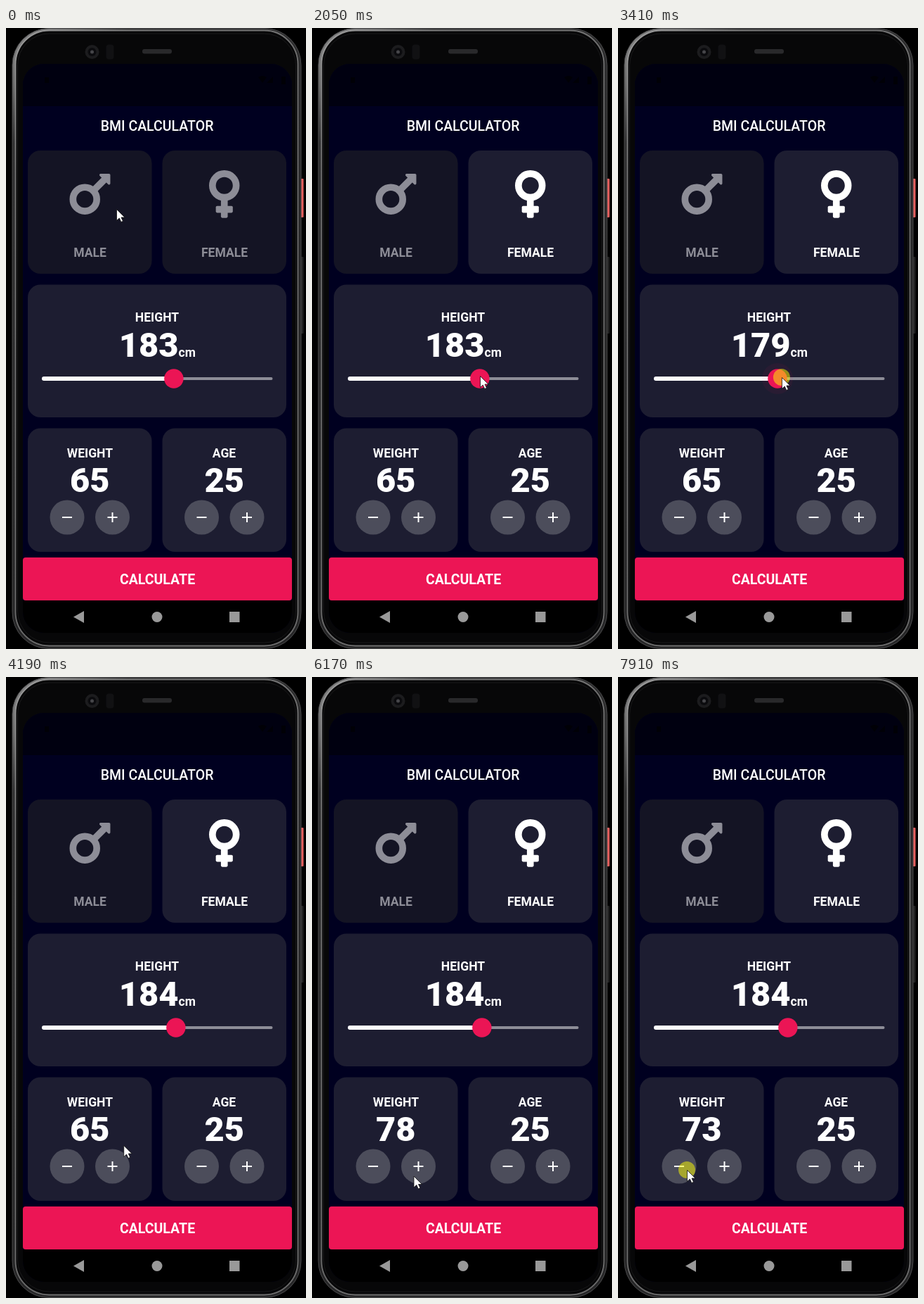
Recreate the animation shown at these times as an HTML page. Size 427 px wide and 882 px high, loop 7990 ms.

```html
<!DOCTYPE html>
<html lang="en">
<head>
<meta charset="utf-8">
<title>BMI Calculator</title>
<style>
  html, body { margin: 0; width: 100%; height: 100%; overflow: hidden; background: #000; }
  svg { display: block; width: 100vw; height: 100vh; }
  text { font-family: Roboto, sans-serif; fill: #fff; text-anchor: middle; }
  .title { font-size: 19.5px; font-weight: 500; }
  .label { font-size: 17.55px; font-weight: 700; }
  .number { font-size: 48.75px; font-weight: 900; }
  .card { fill: #1d1d31; }
  .gender { color: #8d8d97; }
  .gender .card { fill: #141424; }
  .gender .label { fill: currentColor; }
  .gender.on { color: #fff; }
  .gender.on .card { fill: #1d1d31; }
  .icon { fill: currentColor; stroke: currentColor; }
</style>
</head>
<body>
<svg viewBox="0 0 427 882">
  <defs>
    <linearGradient id="metal" gradientUnits="userSpaceOnUse" x1="10" y1="0" x2="420" y2="410">
      <stop offset="0" stop-color="#8c8c8c"/>
      <stop offset=".1" stop-color="#6a6a6a"/>
      <stop offset=".2" stop-color="#303031"/>
      <stop offset="1" stop-color="#262627"/>
    </linearGradient>
    <linearGradient id="rim" gradientUnits="userSpaceOnUse" x1="10" y1="0" x2="420" y2="410">
      <stop offset="0" stop-color="#a0a0a0"/>
      <stop offset=".25" stop-color="#757575"/>
      <stop offset="1" stop-color="#6c6c6c"/>
    </linearGradient>
    <clipPath id="screen"><rect x="24" y="51" width="383" height="808" rx="30"/></clipPath>
    <g id="minus">
      <circle r="24.5" fill="#4c4d5b"/>
      <path d="M-7 0H7" stroke="#fff" stroke-width="2"/>
    </g>
    <g id="plus">
      <use href="#minus"/>
      <path d="M0-7V7" stroke="#fff" stroke-width="2"/>
    </g>
  </defs>

  <!-- Phone body -->
  <rect x="419" y="214" width="4.5" height="55" rx="1" fill="#e8605f"/>
  <rect x="419" y="325" width="4.5" height="109" rx="1" fill="#222"/>
  <rect x="9" y=".500" width="411" height="881" rx="52" fill="url(#metal)" stroke="#4a4a4b"/>
  <rect x="13.500" y="3.500" width="402" height="874" rx="48" fill="#070708" stroke="url(#rim)" stroke-width="1.800"/>
  <rect x="16.500" y="8" width="396" height="865" rx="45" fill="none" stroke="#19191a"/>
  <circle cx="122.500" cy="34" r="10" fill="#1c1c1e"/>
  <circle cx="122.500" cy="34" r="6" fill="#0b0b0e"/>
  <circle cx="122.500" cy="34" r="2.500" fill="#454549"/>
  <rect x="142.500" y="23.500" width="11" height="21" rx="4" fill="#111113"/>
  <rect x="194" y="30" width="42" height="6.500" rx="3" fill="#29292b"/>

  <g clip-path="url(#screen)">
    <rect x="24" y="51" width="383" height="808" fill="#000020"/>
    <rect x="24" y="51" width="383" height="60" fill="#000010"/>
    <path d="M359 70q6-4 12 0l-6 8zM380 69v9h-9zM392 69h6v11h-6zM55 70h6v8h-6z" fill="#000006"/>
    <rect x="24" y="813" width="383" height="46" fill="#000"/>
  </g>
  <text class="title" x="215" y="146">BMI CALCULATOR</text>

  <g class="gender" id="male">
    <rect class="card" x="31" y="174" width="176.500" height="175" rx="18"/>
    <g class="icon" transform="translate(90.500 197.300) scale(.151)">
      <circle cx="144" cy="304" r="112" fill="none" stroke-width="64"/>
      <path d="M232 216L340 108" stroke-width="64"/>
      <path stroke="none" d="M372 64h-79c-10.700 0-16 12.900-8.500 20.400l78.800 78.800c7.600 7.600 20.400 2.200 20.400-8.500V76c0-6.600-5.400-12-12-12z"/>
    </g>
    <text class="label" x="119.500" y="325">MALE</text>
  </g>
  <g class="gender" id="female">
    <rect class="card" x="222.500" y="174" width="176.500" height="175" rx="18"/>
    <g class="icon" transform="translate(289 197.200) scale(.151)">
      <circle cx="144" cy="176" r="112" fill="none" stroke-width="64"/>
      <g stroke="none">
        <rect x="112" y="300" width="64" height="180" rx="12"/>
        <rect x="64" y="368" width="160" height="64" rx="12"/>
      </g>
    </g>
    <text class="label" x="311" y="325">FEMALE</text>
  </g>

  <rect class="card" x="31" y="364.500" width="368" height="188.500" rx="18"/>
  <text class="label" x="215" y="417">HEIGHT</text>
  <text class="number" id="height" x="245.500" y="466.500" style="text-anchor:end"></text>
  <text class="label" x="245.500" y="466.500" style="text-anchor:start">cm</text>
  <path d="M53 498H377.500" stroke="#8d8d97" stroke-width="4" stroke-linecap="round"/>
  <path id="filled" stroke="#fff" stroke-width="6" stroke-linecap="round"/>
  <circle id="halo" cy="498" r="22" fill="#eb1555" opacity=".06"/>
  <circle id="thumb" cy="498" r="13.700" fill="#eb1555"/>

  <rect class="card" x="31" y="568.500" width="176.500" height="175.500" rx="18"/>
  <text class="label" x="119.500" y="610">WEIGHT</text>
  <text class="number" id="weight" x="119.300" y="658.500"></text>
  <use href="#minus" x="87" y="695"/>
  <use href="#plus" x="151.500" y="695"/>

  <rect class="card" x="222.500" y="568.500" width="176.500" height="175.500" rx="18"/>
  <text class="label" x="310.500" y="610">AGE</text>
  <text class="number" x="310.800" y="658.500">25</text>
  <use href="#minus" x="278.500" y="695"/>
  <use href="#plus" x="343" y="695"/>

  <rect x="24" y="752" width="383" height="61" rx="4" fill="#ec1555"/>
  <text class="title" x="215.500" y="790" style="font-weight:700">CALCULATE</text>
  <g fill="#999">
    <path d="M96 836.500L111 828V845z"/>
    <circle cx="215" cy="836.500" r="7.500"/>
    <rect x="318" y="829" width="14.500" height="15"/>
  </g>

  <g id="pointer">
    <circle id="press" r="12" fill="#ff0" opacity=".5"/>
    <path d="M.5.500V16.500L4.300 13 6.800 18.500 9.500 17.300 7 12H12z" fill="#fff" stroke="#111" stroke-width=".8"/>
  </g>
</svg>
<script>
const LOOP = 7990, STEP = 80;
const $ = id => document.getElementById(id);
const sliderX = cm => 51 + 328 * (cm - 120) / 110;

// Each track is a list of [time, ...values]; a value holds until the next time.
const cursor = [[0, 157, 257]];
const heights = [[0, 183]];
const weights = [[0, 65]];
const gender = [[0, ''], [390, 'male'], [1100, 'female']];
const presses = [[80, 240], [940, 1020], [2130, 3870], [4430, 5790],
                 [6880, 6960], [7040, 7120], [7280, 7360], [7670, 7750], [7910, LOOP]];

function move(start, steps, x, y) {
  const [, x0, y0] = cursor[cursor.length - 1];
  for (let i = 1; i <= steps; i++) {
    const p = i / steps, e = p * p * (3 - 2 * p);
    cursor.push([start + (i - 1) * STEP, x0 + (x - x0) * e, y0 + (y - y0) * e]);
  }
}

// The thumb trails the cursor by one step.
function drag(start, values, y) {
  values.forEach((cm, i) => {
    const time = start + i * STEP;
    heights.push([time, cm]);
    cursor.push([time, sliderX(values[Math.min(i + 1, values.length - 1)]), y]);
  });
}

move(700, 3, 328, 258);
move(1330, 1, 330, 262);
move(1410, 6, 191, 526);
move(1890, 3, 239, 494);
drag(2130, [183, 187, 197, 210, 218, 218, 206, 192, 181, 174, 170], 494);
drag(3170, [171, 173, 176, 179, 181, 183, 184], 496);
move(3640, 1, 249, 491);
move(3870, 7, 147, 708);
move(6170, 1, 144.500, 708.500);
move(6250, 3, 96, 700);
move(6880, 1, 98, 700);

// Holding plus counts on three of every four steps; each tap on minus takes one off.
weights.push([4510, 66]);
for (let n = 1; n <= 15; n++) weights.push([4590 + n * STEP, 66 + n - Math.floor(n / 4)]);
presses.slice(4).forEach(([time], i) => weights.push([time, 77 - i]));

const at = (track, t) => track.findLast(key => key[0] <= t).slice(1);

function render(now) {
  const t = now % LOOP;
  const [cm] = at(heights, t), [x, y] = at(cursor, t), [chosen] = at(gender, t);
  const thumbX = sliderX(cm);
  $('height').textContent = cm;
  $('weight').textContent = at(weights, t)[0];
  $('filled').setAttribute('d', `M54 498H${thumbX}`);
  $('thumb').setAttribute('cx', thumbX);
  $('halo').setAttribute('cx', thumbX);
  $('halo').style.display = t >= 2130 && t < 3870 ? '' : 'none';
  $('male').classList.toggle('on', chosen === 'male');
  $('female').classList.toggle('on', chosen === 'female');
  $('pointer').setAttribute('transform', `translate(${x} ${y})`);
  $('press').style.display = presses.some(([on, off]) => t >= on && t < off) ? '' : 'none';
}

const begin = performance.now();
function frame() {
  render(performance.now() - begin);
  requestAnimationFrame(frame);
}
frame();
</script>
</body>
</html>
```
